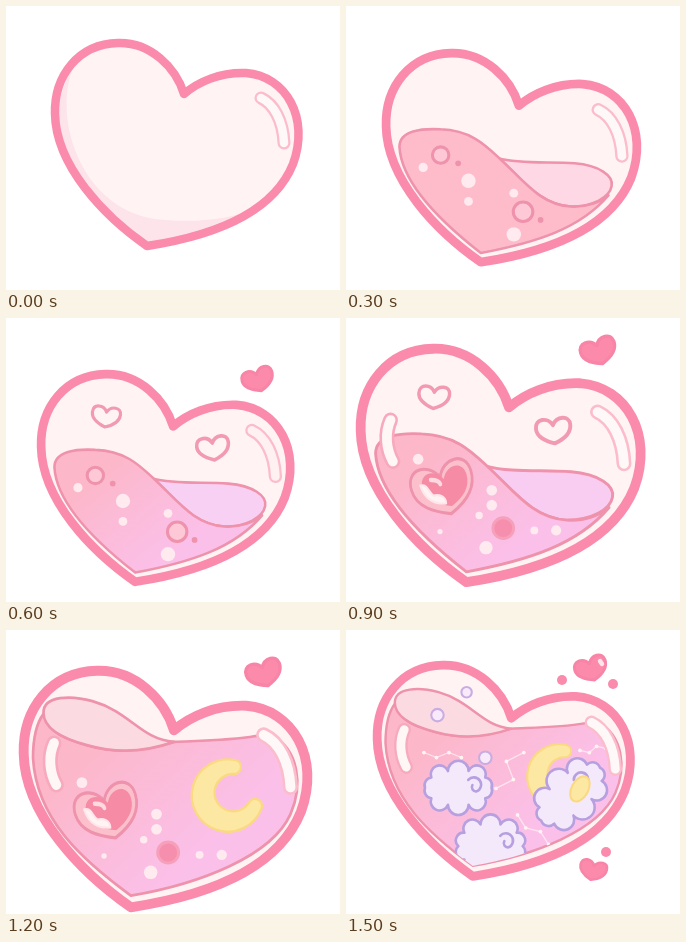
An HTML page for the animation above (1800 ms loop, 334 by 284 pixels).

```html
<!DOCTYPE html>
<html lang="en">
<head>
<meta charset="utf-8">
<title>Heart potion</title>
<style>
html, body { margin: 0; width: 100%; height: 100%; overflow: hidden; background: #fff; }
svg { display: block; width: 334px; height: 284px; }
path, use { stroke-linecap: round; stroke-linejoin: round; }
</style>
</head>
<body>
<svg id="stage" viewBox="0 0 334 284">
  <defs>
    <path id="heart" d="M178 88C170 62 145 36 112 37C72 38 48 70 49 108C50 160 98 210 141 240C200 231 266 210 287 158C304 112 280 70 240 67C214 66 192 76 178 88Z"/>
    <path id="mini" d="M0-5C-4-13-16-13-16-3C-16 5-8 9 0 12C9 9 16 4 16-4C16-13 4-13 0-5Z"/>
    <path id="brew" d="M66 74C70 90 85 96 104 101C128 108 150 106 178 98C200 97 225 97 248 93L262 92C285 105 289 135 278 160C262 196 200 220 141 230C100 200 60 165 57 112C57 95 60 82 66 74Z"/>
    <clipPath id="inside"><use href="#heart"/></clipPath>
    <clipPath id="wet"><use href="#brew"/></clipPath>
    <linearGradient id="mauve" x1=".1" y1=".2" x2=".8" y2=".7">
      <stop offset=".1" stop-color="#fcb7c9"/><stop offset=".9" stop-color="#fbc0ea"/>
    </linearGradient>
  </defs>
</svg>
<script>
const STEP = 300, EDGE = '#fa8bac', LINE = '#ef92ab', CREAM = '#fff3f4', LILAC = '#b6a0e0';
const stage = document.getElementById('stage');

const path = (d, fill, stroke = 'none', w = 2.5) =>
  `<path d="${d}" fill="${fill}" stroke="${stroke}" stroke-width="${w}"/>`;
const dot = (x, y, r, fill = '#ffeaf0', stroke = 'none', w = 2.5) =>
  `<circle cx="${x}" cy="${y}" r="${r}" fill="${fill}" stroke="${stroke}" stroke-width="${w}"/>`;
const pair = (x, y, dx, dy, r, grow = 1, fill) =>
  dot(x, y, r, fill) + dot(x + dx, y + dy, r * grow, fill);
const mini = (x, y, turn, size, fill, stroke, w) =>
  `<use href="#mini" transform="translate(${x} ${y}) rotate(${turn}) scale(${size})" fill="${fill}" stroke="${stroke}" stroke-width="${w}"/>`;
const solid = (x, y, turn, size) => mini(x, y, turn, size, '#fb8aab', '#f884a7', 3);
const hollow = (x, y, turn, size) => mini(x, y, turn, size, CREAM, '#f29ab2', 3.6);

// A thick stroke under a thinner one gives an outlined band.
const band = (d, edge, fill, outer, inner, body = false) =>
  path(d, body ? edge : 'none', edge, outer) + path(d, body ? fill : 'none', fill, inner);
const shineRight = (fill = '#fff8f8') =>
  band('M255 92C268 98 277 115 278 137', '#fbbccb', fill, 13, 8.5);
const shineLeft = band('M75 99C70 110 71 124 77 135', '#f7aabd', '#fff6f6', 13, 8.5);

const bottle = (scale, x, y, content) =>
  `<g transform="translate(${x} ${y}) scale(${scale})"><use href="#heart" fill="${CREAM}"/>
  <g clip-path="url(#inside)">${content}</g>
  <use href="#heart" fill="none" stroke="${EDGE}" stroke-width="8.5"/></g>`;

const halfFull = (front, back) =>
  path('M158 139C180 145 208 142 232 144C256 146 270 156 268 166C266 177 250 186 228 186C198 184 182 160 158 139Z', back, LINE) +
  path('M62 128C62 112 84 110 102 111C132 112 146 127 160 140C182 160 198 184 228 186C245 187 258 181 265 175C238 207 195 221 141 231C105 203 64 165 62 128Z', front, LINE);

const full = `<use href="#brew" fill="url(#mauve)" stroke="${LINE}" stroke-width="2.3"/>` +
  path('M66 73C66 58 90 58 108 63C140 72 150 96 178 98C150 108 125 107 104 101C85 96 66 88 66 73Z', '#fbdbe1', LINE, 2.3);

// Two rings with a speck each, and pearls that spread apart down the slope.
let fizz = dot(85, 148, 4.5);
for (const i of [0, 1]) {
  const x = 102 + 80 * i, y = 136 + 55 * i;
  fizz += dot(x, y, 8 + 1.5 * i, '#ffc8d6', LINE, 3) + dot(x + 17, y + 8, 2.8, LINE);
  for (const side of [-1, 1]) {
    const k = i + 1;
    fizz += dot(85 + 44 * k, 149 + 22 * k + side * 10 * k, side === 2 * i - 1 ? 7 : 4.3);
  }
}

const charm =
  pair(163, 160, 0, 13, 4.6) + pair(200, 195, 19, 0, 3.4, 1.3) +
  pair(158, 210, -6, -28, 5.8, .55) + pair(99, 133, 19, 63, 4.6, .5) +
  dot(173, 193, 9, '#f68fad', '#f7a0bb') +
  `<g transform="translate(121 158) rotate(-17) scale(1.7 1.95)">
    <use href="#mini" fill="#fcc0cd" stroke="${LINE}" stroke-width="1.4"/>
    <use href="#mini" transform="translate(1.5 0) scale(.74)" fill="#f68ba5"/>
    ${path('M-11-4C-11 3-6 6-1 7C0 4-3 2-6 2C-8 0-7-4-11-4Z', CREAM, '#ffe6ea', 1)}
    ${path('M-5-5Q-1-4-1-2', 'none', '#ffd9e0', 2)}
  </g>`;

const moon = band('M229.5 119.6A25 25 0 1 0 247.6 153A22 22 0 1 1 229.5 119.6Z', '#f9da82', '#fde8a3', 14, 10, true);

// Round bumps set around an ellipse, with a curl on the right.
function cloud(x, y, rx, ry, bumps, turn = 0) {
  let d = '';
  for (let i = 0; i <= bumps; i++) {
    const a = 2 * Math.PI * i / bumps;
    const px = rx * Math.cos(a), py = ry * Math.sin(a);
    d += (i ? 'A7.5 7.5 0 0 1 ' : 'M') + px.toFixed(1) + ' ' + py.toFixed(1);
  }
  const curl = `M${rx * .3} ${-ry * .45}a7 7 0 1 1 8 11a4 4 0 0 1-4-6`;
  return `<g transform="translate(${x} ${y}) rotate(${turn})">` +
    path(d + 'Z', '#f4e8fb', LILAC) + path(curl, 'none', LILAC) + '</g>';
}

// Zigzag of four stars joined by a thin line.
function constellation(x, y, dx, dy, sway) {
  const points = [0, 1, 2, 3].map(i => [x + dx * i + sway * dy * (i % 2), y + dy * i - sway * dx * (i % 2)]);
  return path('M' + points.join('L'), 'none', '#ffe6ee', 1.2) +
    points.map(p => dot(...p, 1.8, '#fff4f2')).join('');
}

const sky =
  `<g clip-path="url(#wet)">` +
  constellation(94, 121, 12, 0, -.4) + constellation(190, 121, -5, 13, -.9) +
  constellation(244, 119, 8, -2, -.5) + constellation(184, 181, 11, 8, -.4) + moon +
  cloud(127, 155, 32, 17, 10) + cloud(158, 211, 31, 22, 10) + cloud(235, 161, 38, 18, 10, -42) +
  `<ellipse cx="244" cy="156" rx="8" ry="13" transform="rotate(28 244 156)" fill="#fde8a3" stroke="#f9da82" stroke-width="2"/></g>` +
  [[107, 85, 6], [135, 63, 5], [153, 126, 6]].map(([x, y, r]) => dot(x, y, r, '#f8eafa', '#c8ade2', 2)).join('');

const shade = path('M68 60C45 110 75 210 160 214C195 217 225 212 250 203C210 225 175 232 141 237C98 205 51 160 52 108C53 90 60 72 68 60Z', '#fde4ea');

const scenes = [
  bottle(1, 0, 0, shade + shineRight()),
  bottle(1.03, -10.4, 9, halfFull('#febccb', '#ffd8e6') + fizz + shineRight()),
  bottle(1.023, -15, 18.3, halfFull('url(#mauve)', '#f8d0f4') + fizz + shineRight('#fff0f1')) +
    hollow(100, 98.5, 8, .88) + hollow(207, 130, -8, 1) + solid(252, 61.5, -18, .98),
  bottle(1.15, -41.7, -11.8, halfFull('url(#mauve)', '#f9cdf1') + charm + shineLeft + shineRight()) +
    hollow(88, 79, 4, .96) + hollow(207.5, 112.5, -6, 1.08) + solid(252.5, 33, -18, 1.1),
  bottle(1.165, -39.4, -2.3, full + charm + moon + shineLeft + shineRight()) +
    solid(258, 43, -18, 1.1),
  bottle(1.04, -19.8, -3.3, full + sky + shineLeft + shineRight()) +
    solid(245, 38.5, -18, 1) + path('M254 31L256 34', 'none', '#ffe6ed', 4.5) +
    solid(247, 240, 14, .84) + pair(216, 50, 51, 4, 5, 1, EDGE) + dot(260, 222, 5, EDGE)
];

stage.insertAdjacentHTML('beforeend', scenes.map(s => `<g class="scene">${s}</g>`).join(''));
const layers = stage.querySelectorAll('.scene');

function draw() {
  const now = Math.floor(performance.now() / STEP) % layers.length;
  layers.forEach((layer, i) => layer.setAttribute('visibility', i === now ? 'visible' : 'hidden'));
  requestAnimationFrame(draw);
}
draw();
</script>
</body>
</html>
```
